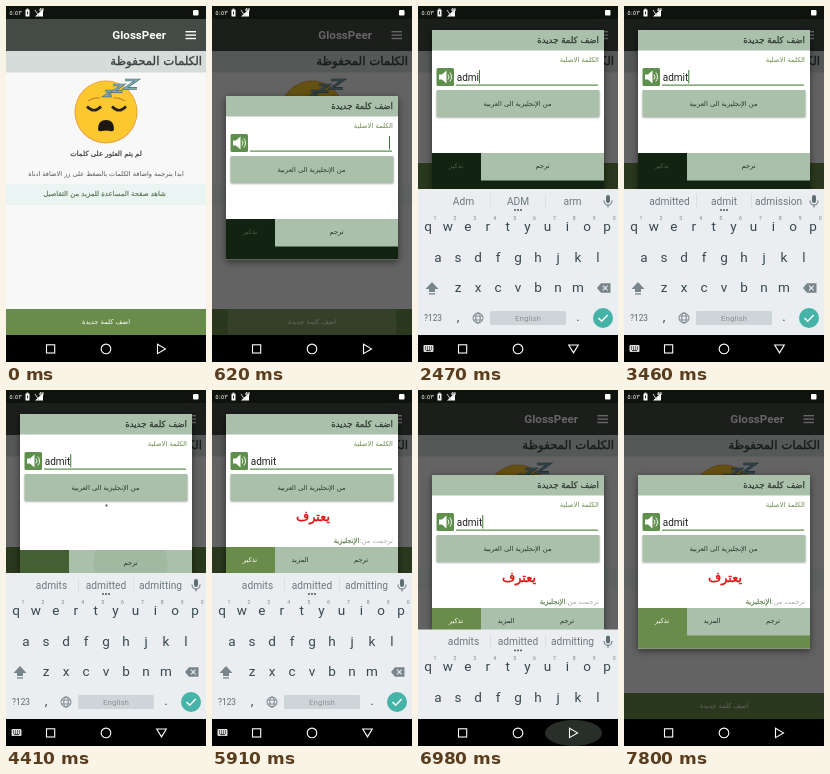
An HTML page with a canvas that plays this animation: 200 px wide and 356 px high, repeating every 8000 ms.

```html
<!DOCTYPE html>
<html lang="ar">
<head>
<meta charset="utf-8">
<title>Vocabulary app</title>
<style>
html, body { margin: 0; width: 100%; height: 100%; overflow: hidden; background: #000; }
canvas { display: block; width: 200px; height: 356px; }
</style>
</head>
<body>
<canvas id="stage"></canvas>
<script>
const LOOP = 8000, KB_TOP = 183, NAV_TOP = 329;
const GREEN = '#698c4a', PALE = '#abc0ab';
const ARABIC = '"DejaVu Sans", sans-serif', LATIN = 'Roboto, sans-serif';
const canvas = document.getElementById('stage'), c = canvas.getContext('2d');
const dpr = window.devicePixelRatio || 1;
canvas.width = 200 * dpr;
canvas.height = 356 * dpr;

const span = (t, a, b) => Math.min(1, Math.max(0, (t - a) / (b - a)));
const ease = x => .5 - .5 * Math.cos(Math.PI * x);
const mix = (a, b, x) => a + (b - a) * x;
const during = (t, a, b) => t >= a && t < b;

// time pressed, letter, key centre
const PRESSES = [
  [1000, 'a', 20, 252], [1180, 'd', 60, 252], [1360, 'm', 160, 282],
  [2300, 'i', 150, 220], [3300, 't', 90, 220]
];
const HINTS = [
  [0], [1060, 'a', 'I', 'and'], [1240, 'ad', 'and', 'as'], [2010, 'Adm', 'ADM', 'arm'],
  [2840, 'admitted', 'admit', 'admission'], [3830, 'admits', 'admitted', 'admitting']
];

function box(x, y, w, h, fill, r = 0) {
  c.fillStyle = fill;
  c.beginPath();
  c.roundRect(x, y, w, h, r);
  c.fill();
}
function disc(x, y, r, fill, ry = r) {
  c.fillStyle = fill;
  c.beginPath();
  c.ellipse(x, y, r, ry, 0, 0, 7);
  c.fill();
}
function shape(d, fill, stroke, width = 1) {
  const p = new Path2D(d);
  if (fill) { c.fillStyle = fill; c.fill(p); }
  if (stroke) { c.strokeStyle = stroke; c.lineWidth = width; c.stroke(p); }
}
function text(s, x, y, size, fill, align = 'center', weight = 400, family = LATIN) {
  c.font = `${weight} ${size}px ${family}`;
  c.direction = family === ARABIC ? 'rtl' : 'ltr';
  c.textAlign = align;
  c.fillStyle = fill;
  c.fillText(s, x, y);
  return c.measureText(s).width;
}
// a thin outline gives a medium weight
function arabic(s, x, y, size, fill, align, outline = 0) {
  const width = text(s, x, y, size, fill, align, 400, ARABIC);
  if (outline) {
    c.strokeStyle = fill;
    c.lineWidth = outline;
    c.strokeText(s, x, y);
  }
  return width;
}

function ripple(x, y, w, h, p, fill) {
  if (p <= 0 || p >= 1) return;
  c.save();
  c.beginPath();
  c.rect(x, y, w, h);
  c.clip();
  c.globalAlpha = 1 - p * .7;
  disc(x + w / 2, y + h / 2, w * .6 * p, fill);
  c.restore();
}

function statusBar() {
  box(0, 0, 200, 13, '#0e130e');
  arabic('٥:٥٣', 9.5, 9, 6.5, '#ddd');
  box(19.5, 3.5, 4, 7, '#fff', .6);
  box(20.6, 2.6, 1.8, 1, '#fff');
  box(21, 5.5, 1, 3, '#333');
  shape('M29 10.5L37 10.5L37 3Z', '#fff');
  shape('M29 4L33 10', null, '#ccc');
  text('4G', 35.5, 5, 4, '#fff', 'center', 700);
  box(187, 4, 5.5, 5.5, '#fff', 1);
}

function emoji() {
  disc(100, 106, 31.5, '#ec9a45');
  disc(100, 105.8, 30.6, '#fbc92f');
  for (const x of [88, 113]) {
    const s = x < 100 ? -1 : 1;
    shape(`M${x - 7} 100.5Q${x} 108 ${x + 7} 100.5`, null, '#2a2118', 2.6);
    shape(`M${x - 6 * s} 92Q${x} 91 ${x + 6 * s} 95`, null, '#c58a2a', 1.2);
  }
  shape('M92 123Q92 114 100 114T108 123Q108 126 104 125Q100 124 96 125Q92 126 92 123Z', '#1f1712');
  for (const [x, y, s] of [[99, 85, 7], [107, 79, 9.5], [119, 74, 12]]) {
    const z = `M${x} ${y}h${s}l${-s} ${s * .7}h${s}`;
    shape(z, null, '#4f6d74', 2.6);
    shape(z, null, '#7fa9b3', 1.4);
  }
}

function mainScreen(t, bottom) {
  box(0, 13, 200, 316, '#f8f8f8');
  box(0, 13, 200, 32, '#434b44');
  text('GlossPeer', 160, 33, 11.6, '#fff', 'right', 700);
  for (let i = 0; i < 3; i++) box(179.5, 25 + 3.4 * i, 10.5, 1.4, '#fff');
  box(0, 45, 200, 21.5, '#d5dddb');
  arabic('الكلمات المحفوظة', 196, 59, 11.8, '#3a4240', 'right', .35);
  emoji();
  arabic('لم يتم العثور على كلمات', 100, 150, 7, '#3a3a3a', 'center', .2);
  arabic('ابدا بترجمة واضافة الكلمات بالضغط على زر الاضافة ادناة', 100, 169.5, 6.55, '#555');
  box(0, 178, 200, 21, '#eaf5f3');
  arabic('شاهد صفحة المساعدة للمزيد من التفاصيل', 98.5, 190, 6.9, '#56724f', 'center', .15);
  box(0, bottom - 26, 200, 26, GREEN);
  ripple(0, bottom - 26, 200, 26, span(t, 480, 680), '#9ab780');
  arabic('اضف كلمة جديدة', 100, bottom - 11, 6.7, '#fff');
}

function dialog(t, top) {
  const loading = during(t, 4380, 4950), done = t >= 4950;
  const row = loading ? 136 : done ? 133 : 123;
  const typed = PRESSES.filter(p => t >= p[0] + 50).map(p => p[1]).join('');
  c.save();
  c.translate(0, top);

  c.save();
  c.shadowColor = 'rgba(0,0,0,.5)';
  c.shadowBlur = 7 * dpr;
  c.shadowOffsetY = 2 * dpr;
  box(14, 0, 172, row + 40.5, '#fff');
  c.restore();
  box(14, 0, 172, 20.5, PALE);
  arabic('اضف كلمة جديدة', 181, 13, 8.6, '#2d3730', 'right', .25);
  arabic('الكلمة الاصلية', 181, 32, 6.8, GREEN, 'right');

  box(18.5, 38, 17.5, 18, '#5f8f4c', 1.5);
  shape('M21 44.5h3l4.5-4v13l-4.5-4h-3Z', '#fff');
  shape('M30 44.5q2 2.5 0 5M31.8 42.5q3.5 4.5 0 9', null, '#fff', .9);
  box(38, 54.5, 142, 1.2, '#5f8f4c');
  const w = text(typed, 38.7, 50.5, 10, '#222', 'left');
  const cursor = typed ? !during(t, 5910, 6400) && t < 7800 : t < 880;
  if (cursor) box(typed ? 38.7 + w : 177, 40, 1, 13.5, '#3f7a3a');

  c.save();
  c.shadowColor = 'rgba(0,0,0,.3)';
  c.shadowBlur = 2 * dpr;
  c.shadowOffsetY = dpr;
  box(18.5, 60, 163, 27, PALE, 1);
  c.restore();
  arabic('من الإنجليزية الى العربية', 99.5, 75.5, 6.7, '#2d352f');

  if (loading) {
    const p = (t - 4380) / 600 % 1;
    c.globalAlpha = 1 - p * .8;
    disc(100.5, 91.5, .9 + 5 * p, '#56655a');
    c.globalAlpha = 1;
  }
  if (done) {
    arabic('يعترف', 101, 107, 12.8, '#e01212', 'center', .45);
    const lead = arabic('ترجمت من:', 181, 128.5, 6.8, '#a5aca7', 'right');
    arabic('الإنجليزية', 181 - lead, 128.5, 6.8, '#5a7d4a', 'right', .2);
  }

  const base = done ? GREEN : loading ? '#456035' : '#122411';
  box(14, row, 172, 40.5, base);
  box(63, row, 123, 27.5, PALE);
  if (done) ripple(63, row, 123, 27.5, span(t, 4950, 5200), '#c0d0c0');
  else ripple(63, row, 123, 27.5, span(t, 4120, 4700), '#9db59d');
  arabic('تذكير', 38, row + 15, 6.7, done ? '#fff' : '#4d5d48');
  arabic('ترجم', done ? 149 : 124.5, row + 15, 6.7, '#26302a');
  if (done) arabic('المزيد', 88, row + 15, 6.7, '#26302a');
  c.restore();
}

function keyRow(keys, x, step, y) {
  [...keys].forEach((k, i) => text(k, x + step * i, y, 13.5, '#37474f'));
}

function keyboard(t, shift) {
  c.save();
  c.beginPath();
  c.rect(0, 0, 200, NAV_TOP);
  c.clip();
  c.translate(0, shift);
  box(0, KB_TOP, 200, 146, '#ebeef0');
  for (const x of [72, 127]) box(x, 188, .7, 13, '#d2d8db');
  const hints = HINTS.filter(h => t >= h[0]).pop();
  [45.5, 100, 154.5].forEach((x, i) => hints[i + 1] && text(hints[i + 1], x, 199, 10.2, '#6d7a80'));
  if (hints.length > 1) for (const x of [97, 100, 103]) disc(x, 204, .9, '#37474f');

  box(188, 189, 4, 8, '#5f6d74', 2);
  shape('M186 194.5q0 4.5 4 4.5t4-4.5M190 199v2.5', null, '#5f6d74', 1);

  keyRow('qwertyuiop', 10, 19.9, 224.5);
  [...'1234567890'].forEach((k, i) => text(k, 17 + 19.9 * i, 213.5, 5.2, '#78858b'));
  keyRow('asdfghjkl', 20, 20, 255.5);
  keyRow('zxcvbnm', 40, 20, 286);

  shape('M14 276L20.5 283h-3.5v3h-6v-3H7.5Z', '#78858b');
  box(11, 287.3, 6, 1.3, '#78858b');
  shape('M179 282l4-4.8h9.5v9.6H183Z', '#78858b');
  shape('M185 279.7l4.6 4.6m0-4.6l-4.6 4.6', null, '#eceff1', 1.1);

  text('?123', 15, 315, 8.3, '#5b686e');
  text(',', 40, 315, 13, '#37474f');
  text('.', 160, 315, 13, '#37474f');
  c.strokeStyle = '#6d7a80';
  c.lineWidth = .9;
  for (const rx of [5, 2.2]) {
    c.beginPath();
    c.ellipse(60, 312, rx, 5, 0, 0, 7);
    c.stroke();
  }
  shape('M55.5 310h9M55.5 314h9', null, '#6d7a80', .8);
  box(72, 305, 76, 14, '#ced5d8', 1.5);
  const fade = Math.round(mix(60, 140, span(t, 960, 1280)));
  text('English', 110, 315, 8, `rgb(${fade},${fade + 7},${fade + 10})`);
  disc(185, 312, 10, '#45b3a8');
  shape('M180.5 312l3.2 3.2l6-6.2', null, '#fff', 1.5);

  for (const [at, k, x, y] of PRESSES) {
    if (!during(t, at, at + 150)) continue;
    box(x - 9.5, y - 15, 19, 29, '#d9dfe2', 2);
    box(x - 13, y - 45, 26, 30, '#fafbfc', 2);
    text(k, x, y - 25, 18, '#37474f');
  }
  c.restore();
}

function navBar(t, typing) {
  box(0, NAV_TOP, 200, 27, '#000');
  const p = span(t, 6690, 6850), out = span(t, 6950, 7230);
  if (p > 0 && out < 1) {
    c.globalAlpha = 1 - out;
    disc(155.5, 343, 28.5 * p, '#2c352d', 13 * p);
    c.globalAlpha = 1;
  }
  c.strokeStyle = '#fff';
  c.lineWidth = 1.1;
  c.strokeRect(40.5, 338.8, 8.2, 8.2);
  c.beginPath();
  c.arc(100, 342.9, 4.8, 0, 7);
  c.stroke();
  shape(typing ? 'M150.7 339h9.6l-4.8 7.9Z' : 'M151.5 338.2v9.4l8-4.7Z', null, '#fff', 1.1);
  if (typing) {
    box(5.5, 339, 10, 7, '#ddd', 1);
    for (let i = 0; i < 8; i++) box(7 + i % 4 * 2, 340.5 + (i >> 2) * 2, 1, 1, '#000');
    box(8, 344.3, 5, .8, '#000');
  }
}

function draw(t) {
  c.setTransform(dpr, 0, 0, dpr, 0, 0);
  const up = ease(span(t, 740, 920)), down = ease(span(t, 6870, 7130));
  const raised = up * (1 - down);
  const typing = during(t, 760, 6750);
  const resized = during(t, 780, 6900);
  mainScreen(t, resized ? KB_TOP : NAV_TOP);

  const shown = span(t, 530, 610);
  if (shown > 0) {
    box(0, 13, 200, 316, `rgba(0,0,0,${.6 * shown})`);
    const top = t < 4000
      ? mix(90, 24, ease(span(t, 740, 900)))
      : mix(24, 85, ease(span(t, 6800, 6980)));
    c.save();
    c.globalAlpha = shown;
    const s = mix(.92, 1, shown);
    c.translate(100 * (1 - s), 171 * (1 - s));
    c.scale(s, s);
    dialog(t, top);
    c.restore();
  }
  statusBar();
  if (raised > 0) keyboard(t, 146 * (1 - raised));
  navBar(t, typing);
}

const start = performance.now();
function tick() {
  draw((performance.now() - start) % LOOP);
  requestAnimationFrame(tick);
}
tick();
</script>
</body>
</html>
```
